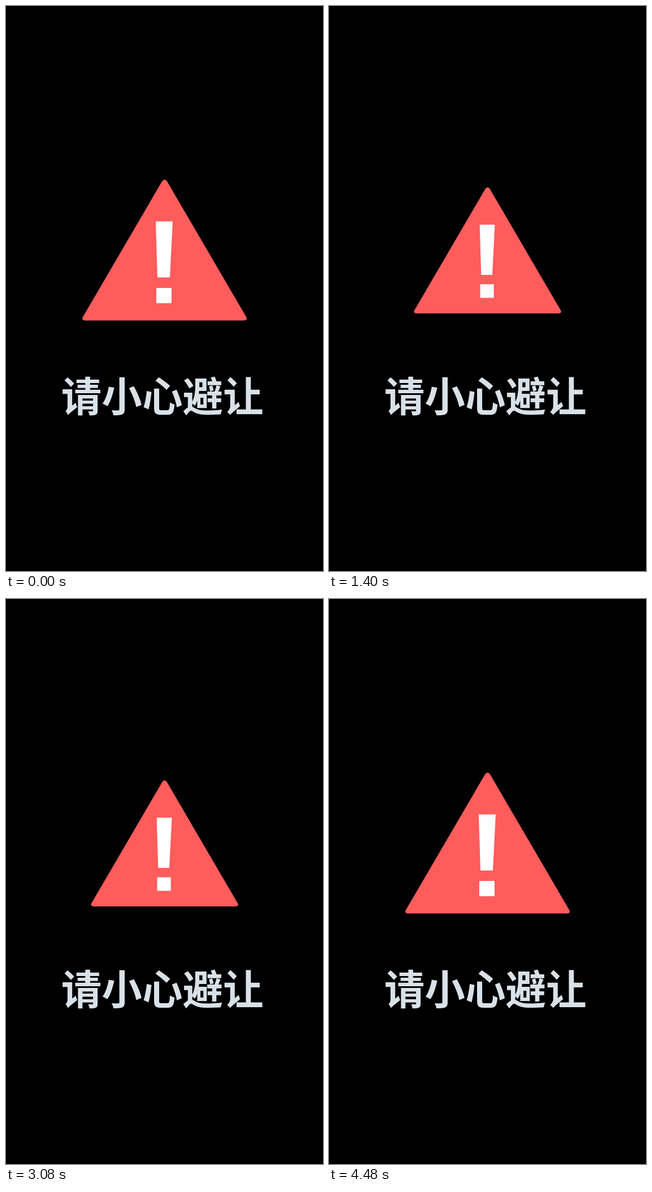
These frames come from a looping animation (561 px wide and 998 px high, 5 s). An HTML page:

```html
<!DOCTYPE html>
<html lang="zh-CN">
<head>
<meta charset="utf-8">
<title>请小心避让</title>
<style>
  html, body { margin: 0; width: 100%; height: 100%; overflow: hidden; background: #000; }
  svg { display: block; width: 100%; height: 100%; }
  text { font: bold 71.6px "Noto Sans CJK SC", "Noto Sans CJK", sans-serif; fill: #d9e1e8; }
</style>
</head>
<body>
<svg viewBox="0 0 561 998">
  <g id="sign">
    <path fill="#ff5c5c" d="M276 310Q280.6 303.3 285.2 310L425.2 549.3Q428.2 555.5 420.8 555.5H140.5Q133 555.5 136 549.3Z"/>
    <path fill="#fff" d="M265 380.5H295L290 479.5H268ZM266 498H293V525H266Z"/>
  </g>
  <text x="97.7" y="716">请小心避让</text>
</svg>
<script>
  const LOOP = 5000, STEP = 40, PULSE = 640, ACTIVE = 4480;
  const SHRINK = 1 / 3, CX = 280.7, CY = 436;
  const sign = document.getElementById('sign');

  const ease = u => u * u * (3 - 2 * u);

  // Shrink to two thirds and back, then rest until the loop ends
  function scaleAt(t) {
    if (t >= ACTIVE) return 1;
    const phase = t % PULSE / PULSE;
    return 1 - SHRINK * ease(1 - Math.abs(1 - 2 * phase));
  }

  function draw() {
    const t = Math.floor(performance.now() % LOOP / STEP) * STEP;
    const s = scaleAt(t);
    sign.setAttribute('transform', `translate(${CX} ${CY}) scale(${s}) translate(${-CX} ${-CY})`);
    requestAnimationFrame(draw);
  }
  draw();
</script>
</body>
</html>
```
